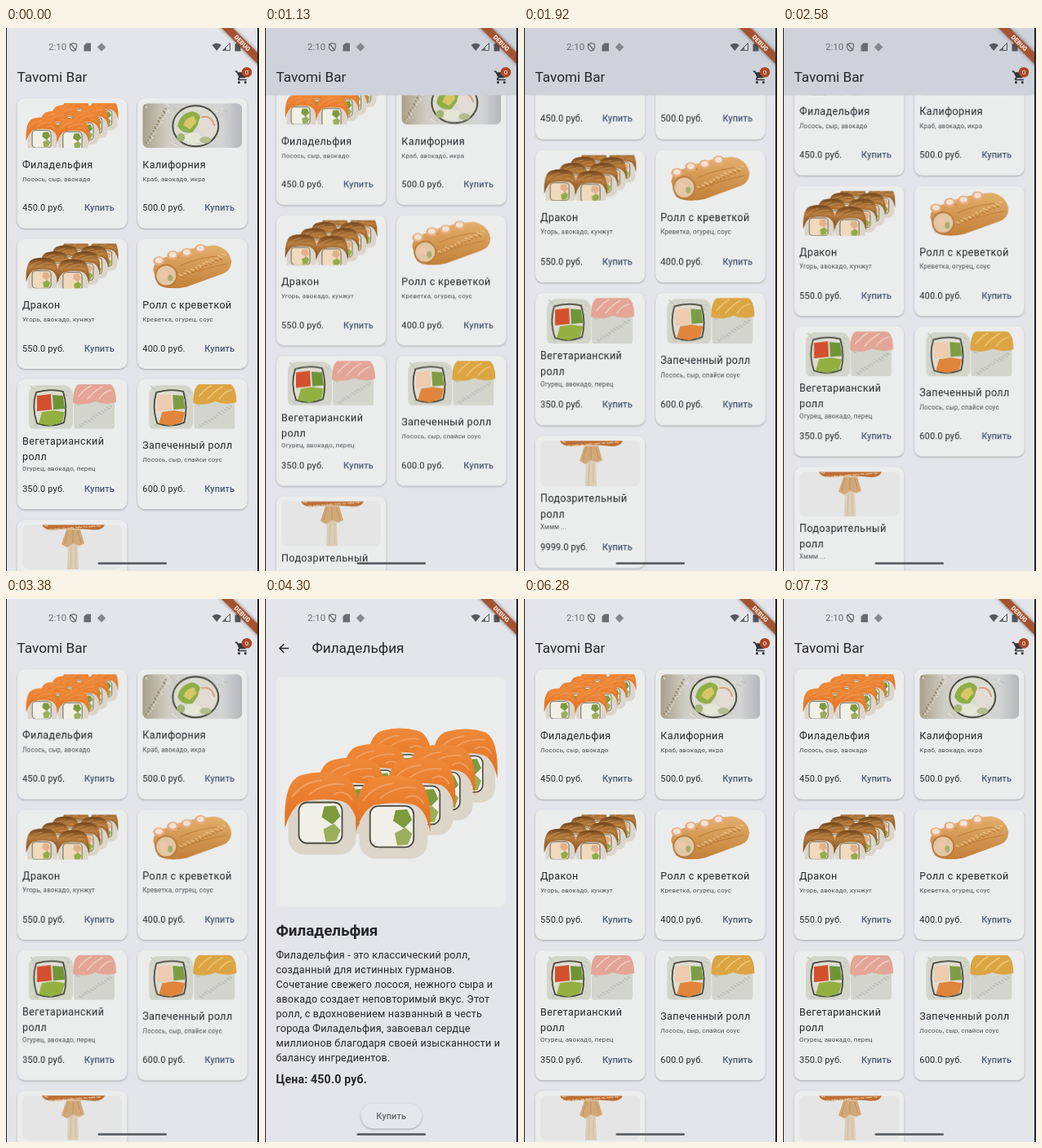
Write an HTML page that moves like this. It is 310x666 px and loops after 8 s.

```html
<!DOCTYPE html>
<html lang="ru">
<head>
<meta charset="utf-8">
<title>Sushi menu</title>
<style>
html, body { margin: 0; width: 100%; height: 100%; overflow: hidden; background: #e3e5ea; }
svg { display: block; width: 310px; height: 666px; font-family: Roboto, sans-serif; fill: #25272b; }
.title { font-size: 17.2px; }
.name { font-size: 12.5px; letter-spacing: .39px; }
.desc { font-size: 7.84px; letter-spacing: .2px; fill: #4c4e52; }
.price { font-size: 11px; letter-spacing: .15px; }
.buy { font-size: 11px; letter-spacing: .1px; font-weight: 500; fill: #4c5d79; }
.head { font-size: 18.8px; font-weight: 700; }
.body { font-size: 12.5px; letter-spacing: .2px; }
.cost { font-size: 14.1px; letter-spacing: .2px; font-weight: 700; }
.card { fill: #ebecec; filter: drop-shadow(0 1px 1px rgba(0,0,0,.28)); }

#scroll, #stretch, #bar, #home, #detail { animation: 8s linear infinite; }
#scroll { animation-name: scroll; }
#stretch { animation-name: stretch; }
#bar { animation-name: bar; }
#home { animation-name: home; transform-origin: 155px 333px; }
#detail { animation-name: detail; transform-origin: 155px 333px; }

@keyframes scroll {
  0%, 9.875% { transform: translateY(0); }
  14.125% { transform: translateY(-28.5px); }
  15.75% { transform: translateY(-52px); }
  17.375% { transform: translateY(-82px); }
  18.625%, 31.5% { transform: translateY(-100px); }
  32.25% { transform: translateY(-65px); }
  34.75%, 100% { transform: translateY(0); }
}
@keyframes stretch {
  0%, 18.625% { transform: scaleY(1); transform-origin: 0 666px; }
  19.875%, 23% { transform: scaleY(1.022); transform-origin: 0 666px; }
  24% { transform: scaleY(1.0174); transform-origin: 0 666px; }
  27.25%, 31% { transform: scaleY(1); transform-origin: 0 666px; }
  31.01%, 34.25% { transform: scaleY(1); transform-origin: 0 82px; }
  35.5% { transform: scaleY(1.012); transform-origin: 0 82px; }
  39.75%, 99.9% { transform: scaleY(1); transform-origin: 0 82px; }
  100% { transform: scaleY(1); transform-origin: 0 666px; }
}
@keyframes bar {
  0%, 9.875% { opacity: 0; }
  12%, 33.5% { opacity: 1; }
  35%, 100% { opacity: 0; }
}
@keyframes home {
  0%, 51% { transform: scale(1); animation-timing-function: cubic-bezier(.3,0,.1,1); }
  53.75%, 63.24% { transform: scale(1.05); }
  63.25% { transform: scale(1.1); animation-timing-function: cubic-bezier(.2,.2,.1,1); }
  66.875%, 100% { transform: scale(1); }
}
@keyframes detail {
  0%, 51% { opacity: 0; transform: scale(.85); }
  51.4% { opacity: 0; transform: scale(.88); }
  52.1% { opacity: 1; transform: scale(.96); }
  53.75%, 63.25% { opacity: 1; transform: scale(1); }
  63.55% { opacity: 1; transform: scale(.98); }
  64.3% { opacity: 0; transform: scale(.94); }
  66.875%, 100% { opacity: 0; transform: scale(.9); }
}
</style>
</head>
<body>
<svg viewBox="0 0 310 666" xmlns="http://www.w3.org/2000/svg">
  <defs>
    <clipPath id="view"><rect y="82" width="310" height="584"/></clipPath>
    <clipPath id="thumb"><rect width="122" height="54.7" rx="7"/></clipPath>
    <clipPath id="photo"><rect width="282" height="282" rx="9.4"/></clipPath>
    <linearGradient id="blur">
      <stop offset="0" stop-color="#a8a08a"/><stop offset=".25" stop-color="#cfcdc4"/>
      <stop offset=".8" stop-color="#d3d4d4"/><stop offset="1" stop-color="#b4b7ba"/>
    </linearGradient>
    <linearGradient id="crust" x2="0" y2="1">
      <stop offset="0" stop-color="#e3b06c"/><stop offset="1" stop-color="#c27f38"/>
    </linearGradient>
    <linearGradient id="salmon" x2="0" y2="1">
      <stop offset="0" stop-color="#ee8a3a"/><stop offset="1" stop-color="#e2701f"/>
    </linearGradient>
    <linearGradient id="eel" x2="0" y2="1">
      <stop offset="0" stop-color="#6f431c"/><stop offset=".35" stop-color="#b57b3c"/><stop offset="1" stop-color="#7d4c20"/>
    </linearGradient>
  </defs>
  <rect width="310" height="666" fill="#e3e5ea"/>

  <g id="home">
    <rect width="310" height="666" fill="#e3e5ea"/>
    <g clip-path="url(#view)"><g id="stretch"><g id="scroll"></g></g></g>
    <rect id="bar" x="-10" y="-20" width="330" height="102.5" fill="#ced2da"/>
    <text class="title" x="13.5" y="66">Tavomi Bar</text>
    <path transform="translate(280 51) scale(.784)" fill="#33363c" d="M7 18a2 2 0 100 4 2 2 0 000-4zM1 2v2h2l3.6 7.6-1.35 2.4C4.5 15.4 5.5 17 7 17h12v-2H7.4l1.1-2h7.45c.75 0 1.4-.4 1.75-1l3.6-6.5A1 1 0 0020 4H5.2l-.94-2zM17 18a2 2 0 100 4 2 2 0 000-4z"/>
    <circle cx="295" cy="54.3" r="6.3" fill="#ab4724"/>
    <text x="295" y="57" font-size="8" fill="#fff" text-anchor="middle">0</text>
  </g>

  <g id="detail">
    <rect width="310" height="666" fill="#e3e5ea"/>
    <path d="M29 60.5H18M23.3 55.2L18 60.5l5.3 5.3" fill="none" stroke="#25272b" stroke-width="1.6"/>
    <text class="title" x="57.5" y="66">Филадельфия</text>
    <g id="hero" transform="translate(13.5 95.5)" clip-path="url(#photo)"></g>
    <text class="head" x="13.5" y="412.5">Филадельфия</text>
    <g id="story"></g>
    <text class="cost" x="13.5" y="594">Цена: 450.0 руб.</text>
    <rect x="117.5" y="618.5" width="74.5" height="31" rx="15.5" fill="#e6e7eb" style="filter:drop-shadow(0 1px 1px rgba(0,0,0,.3))"/>
    <text class="buy" x="154.7" y="638" text-anchor="middle" style="fill:#67696d">Купить</text>
  </g>

  <g fill="#686b70">
    <text x="52" y="27.3" font-size="11.5" fill="#686b70">2:10</text>
    <path d="M82.5 18.5l4 1.5v3.3q0 3-4 5-4-2-4-5v-3.3zM79 19.5l7 8" fill="none" stroke="#686b70" stroke-width="1.2"/>
    <path d="M98.5 18.5h5.5v10h-8.5v-7z"/>
    <rect x="113.3" y="19.7" width="7.4" height="7.4" transform="rotate(45 117 23.4)" fill="#85888c"/>
    <path d="M252.5 21q5.7-4.5 11.4 0l-5.7 7z" fill="#54575c"/>
    <path d="M274.5 18.5v9h-9z" fill="none" stroke="#54575c"/><path d="M270 22.5v5.5h-5.5z"/>
    <path d="M280.5 19.5h2v-1.5h3v1.5h2v9h-7z" fill="#54575c"/>
  </g>
  <rect x="112.5" y="655.3" width="84.5" height="2.7" rx="1.35" fill="#5e6064"/>
  <g transform="translate(308 0) rotate(45)">
    <rect x="-40" y="21.3" width="80" height="9.6" fill="#a5522f" style="filter:drop-shadow(0 0 2px rgba(0,0,0,.5))"/>
    <text y="28.8" font-size="7.7" font-weight="900" fill="#f3e7df" text-anchor="middle">DEBUG</text>
  </g>
  <path d="M0 0h1v666H0zM308 0h2v666h-2z" fill="#202226"/>
</svg>

<script>
const $ = id => document.getElementById(id);
const box = (x, y, w, h, r, fill, more = '') =>
  `<rect x="${x}" y="${y}" width="${w}" height="${h}" rx="${r}" fill="${fill}" ${more}/>`;
const oval = (x, y, rx, ry, fill, more = '') =>
  `<ellipse cx="${x}" cy="${y}" rx="${rx}" ry="${ry}" fill="${fill}" ${more}/>`;
const shape = (d, fill, more = '') => `<path d="${d}" fill="${fill}" ${more}/>`;
const line = (d, color, w) => shape(d, 'none', `stroke="${color}" stroke-width="${w}" stroke-linecap="round"`);
const nori = w => `stroke="#4a4c40" stroke-width="${w}"`;

// One roll in a 90 x 102 box
function roll(x, y, size, c) {
  return `<g transform="translate(${x} ${y}) scale(${size})">` +
    box(4, 22, 83, 79, 20, '#dcd5c9') +
    shape('M0 68Q-3 8 22 3Q45-3 69 3Q93 8 90 68Q84 38 68 35Q45 31 22 36Q8 42 0 68Z', c.top) +
    line('M9 30Q22 12 44 10M30 27Q48 12 72 15M60 27Q74 20 82 34', c.vein, 1.8) +
    box(17, 37, 53, 50, 10, c.core, nori(1.8)) +
    shape('M48 42l14-1 6 13-10 10-13-9z', c.side) +
    shape('M47 70l13-7 8 8-5 13-13 1z', c.side2) + '</g>';
}
const salmon = { top: 'url(#salmon)', vein: '#f2a062', core: '#f1f0e8', side: '#7d9a3c', side2: '#9cae5a' };
const eel = { top: 'url(#eel)', vein: '#cb985a', core: '#f0d9bd', side: '#e2b08a', side2: '#8fae44' };
const platter = c => [[112, 63, .88], [191, 64, .89], [82, 82, .88], [161, 83, .92], [50, 99, .93],
  [135, 99, .94], [11, 117, 1], [98, 121, 1.01]].map(r => roll(...r, c)).join('');
const small = c => `<g transform="translate(0 -33.5) scale(.433)">${platter(c)}</g>`;

const speckle = (x, y, w, h, n, color) => Array.from({ length: n }, (_, i) =>
  oval((x + (i * .618 % 1) * w).toFixed(1), (y + (i * .387 % 1) * h).toFixed(1), 1.3, .8, color)).join('');

function california() {
  return box(0, 0, 122, 55, 0, 'url(#blur)') +
    speckle(2, 2, 28, 50, 18, '#8f7a52') + speckle(4, 4, 30, 48, 16, '#dedbd0') +
    speckle(30, 2, 72, 50, 50, '#e6e6e1') + speckle(34, 4, 70, 48, 30, '#bcbcb4') +
    oval(65, 28, 28, 25, '#d9dad0', nori(2)) +
    shape('M43 28Q45 13 61 10Q72 12 71 22L61 36Q48 38 43 28Z', '#8fae48') +
    shape('M50 27Q53 17 63 16L66 23 58 32Z', '#d8c766') +
    oval(79, 27, 11, 14, '#e3dcd4') + line('M73 17Q84 14 88 27', '#d8a080', 2) +
    oval(62, 43, 11, 7, '#e4e6d6') + oval(47, 42, 5, 5, '#a2b571') + oval(77, 45, 7, 4, '#b4bd8e');
}

function shrimp() {
  const tops = [[20, 21], [37, 14], [54, 11], [71, 6]];
  return shape('M13 32Q14 20 30 16Q60 3 88 2Q106 5 109 22Q108 34 98 37L54 53Q30 58 19 50Z', 'url(#crust)') +
    line('M46 27Q70 16 96 15M54 38Q76 30 102 25', '#b4742f', .8) +
    speckle(40, 10, 62, 30, 30, '#eec48a') + speckle(42, 16, 56, 26, 22, '#b87a38') +
    oval(29, 39, 13, 13, '#e2c7a4', 'stroke="#bb7c3e" stroke-width="2"') +
    oval(26, 38, 5, 5, '#f0c6ac') + oval(34, 42, 3, 4, '#a5ae6c') +
    tops.map(([x, y]) => oval(x, y, 7, 5.5, '#e8ab80') + oval(x, y - .5, 4.5, 3.5, '#f3e2d4')).join('');
}

function pair(topping, vein, a, b, c) {
  return box(8, 1, 54, 58, 12, '#d3d5cb') + speckle(11, 3, 47, 50, 34, '#bfc3b8') +
    shape('M17 10Q34 5 50 9Q56 28 51 47Q34 54 18 48Q11 28 17 10Z', '#dfddd2', nori(1.8)) +
    shape('M18 14l17-2 1 19-18 2z', a) + shape('M37 13l13 1 2 16-14 1z', b) +
    shape('M20 48l4-14 14-2 14 2-3 12-14 5z', c) +
    box(63, 4, 50, 56, 10, '#d3d5cc') + speckle(66, 24, 44, 28, 34, '#bcc0b8') +
    shape('M62 23Q62-2 74-1L104-1Q115 0 115 22Q102 26 89 21Q76 27 62 23Z', topping) +
    line('M69 15Q76 6 84 2M80 18Q88 8 98 3M94 18Q100 9 109 7', vein, 1.5);
}

function mushroom() {
  return box(0, 0, 122, 55, 0, '#e5e5e5') +
    shape('M24 0H101Q98 8 84 6Q62 4 42 6Q27 8 24 0Z', '#bd6f35') + speckle(28, 1, 68, 5, 26, '#e6bf90') +
    shape('M57 6h10l2 49H55z', '#dccdb6') + line('M60 27l-1 26M65 28v24', '#c8b79b', .8) +
    shape('M54 6h17l5 17-6 3-8-3-7 5-7-4z', '#d1a878') + line('M56 8l-4 15M62 8v14M68 8l4 14', '#b98c5c', .8);
}

const menu = [
  [['Филадельфия'], 'Лосось, сыр, авокадо', 450, small(salmon)],
  [['Калифорния'], 'Краб, авокадо, икра', 500, california()],
  [['Дракон'], 'Угорь, авокадо, кунжут', 550, small(eel)],
  [['Ролл с креветкой'], 'Креветка, огурец, соус', 400, shrimp()],
  [['Вегетарианский', 'ролл'], 'Огурец, авокадо, перец', 350, pair('#e3a596', '#f0cfc4', '#d2502e', '#6f9436', '#93b040')],
  [['Запеченный ролл'], 'Лосось, сыр, спайси соус', 600, pair('#dca544', '#edc878', '#efcbb0', '#7d9c44', '#e0853a')],
  [['Подозрительный', 'ролл'], 'Хммм ...', 9999, mushroom()]
];
const text = (cls, x, y, s) => `<text class="${cls}" x="${x}" y="${y}">${s}</text>`;

$('scroll').innerHTML = menu.map(([name, desc, price, art], i) => {
  const two = name.length > 1, x = 13.7 + i % 2 * 147.3, y = 86 + (i >> 1) * 172.3;
  return `<g transform="translate(${x} ${y})"><rect class="card" width="134.7" height="159.7" rx="9.4"/>` +
    `<g transform="translate(6.3 6.3)" clip-path="url(#thumb)">${art}</g>` +
    name.map((s, n) => text('name', 6.3, (two ? 80.2 : 85.5) + n * 18.8, s)).join('') +
    text('desc', 6.3, two ? 112.7 : 101.7, desc) +
    text('price', 6.3, 138.3, price.toFixed(1) + ' руб.') + text('buy', 82.3, 138.3, 'Купить') + '</g>';
}).join('');

$('hero').innerHTML = box(0, 0, 282, 282, 0, '#ebecec') + platter(salmon);
$('story').innerHTML = [
  'Филадельфия - это классический ролл,', 'созданный для истинных гурманов.',
  'Сочетание свежего лосося, нежного сыра и', 'авокадо создает неповторимый вкус. Этот',
  'ролл, с вдохновением названный в честь', 'города Филадельфия, завоевал сердце',
  'миллионов благодаря своей изысканности и', 'балансу ингредиентов.'
].map((s, i) => text('body', 13.5, 441 + i * 18, s)).join('');
</script>
</body>
</html>
```
